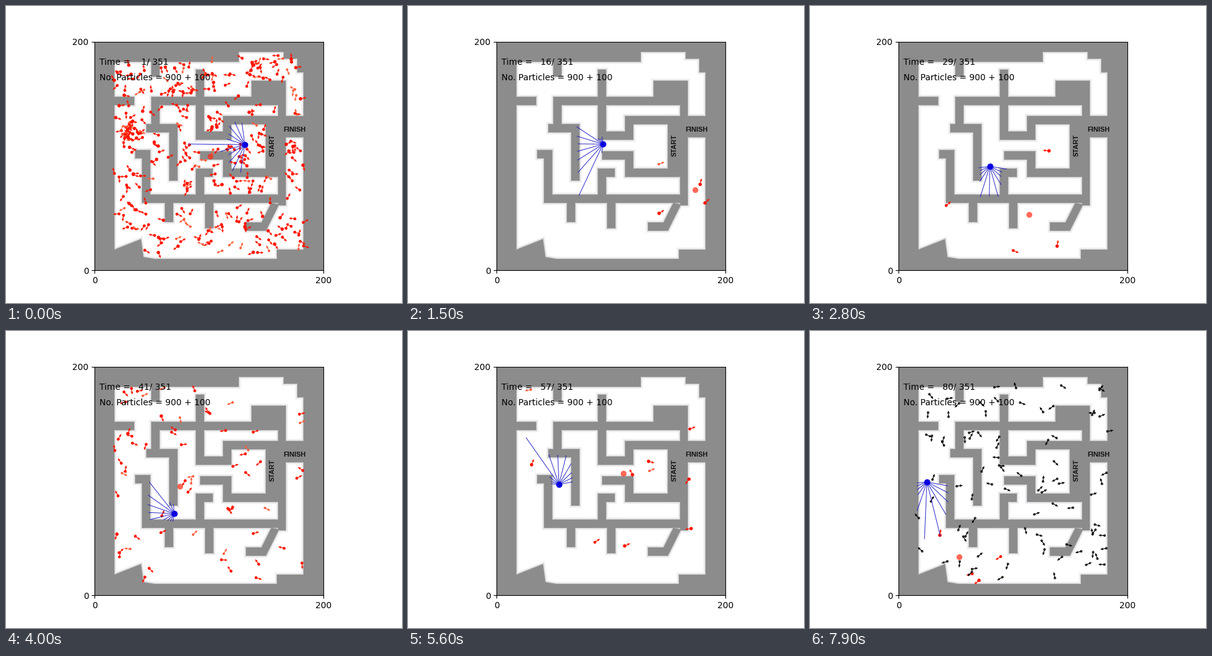
Animation of 640 by 480 pixels, one loop 8000 ms. Source, as a matplotlib script:

```python
import numpy as np
import matplotlib.pyplot as plt
from matplotlib.animation import ArtistAnimation
from matplotlib.collections import LineCollection
from matplotlib.patches import PathPatch
from matplotlib.path import Path

FRAMES = 80
PX = 0.72  # points per pixel at 100 dpi
ORIGIN, SCALE = np.array([143.2, 427.2]), np.array([1.848, -1.848])
RED, ORANGE, WALL = "#ff1400", "#ff5a38", "#8c8c8c"


def unit(p):
    """Stage pixels to map units (0..200, y up)."""
    return (np.asarray(p, float) - ORIGIN) / SCALE


def closed(points):
    return Path(np.vstack([points, points[:1]]), closed=True)


def bars(*points, half=6.5):
    """Thick axis-aligned boxes along a polyline."""
    for a, b in zip(points, points[1:]):
        (x0, y0), (x1, y1) = np.minimum(a, b) - half, np.maximum(a, b) + half
        yield closed(unit([(x0, y0), (x1, y0), (x1, y1), (x0, y1)]))


# ---- map ----
room = closed(unit([(175, 90), (376, 90), (376, 74), (449, 74), (449, 85),
                    (471, 85), (471, 107), (481, 107), (481, 394), (438, 394),
                    (438, 409), (240, 409), (222, 406), (218, 377), (175, 394)]))
border = closed(np.array([(-20, -20), (220, -20), (220, 220), (-20, 220)], float))
walls = [
    *bars((170, 153), (200, 153)),
    *bars((241, 84), (241, 107)),
    *bars((313, 109), (313, 209), (357, 209), (357, 184), (480, 184)),
    *bars((233, 197), (270, 197), (270, 275)),
    *bars((241, 197), (241, 153), (446, 153), (446, 315)),
    *bars((215, 239), (226, 239), (226, 311), (446, 311)),
    *bars((313, 311), (313, 269), (327, 269)),
    *bars((320, 241), (357, 241), (357, 269), (446, 269)),
    *bars((263, 311), (263, 342)),
    *bars((328, 311), (328, 352)),
    *bars((436, 194), (436, 260), half=16),   # start block
    *bars((413, 137), (436, 137), half=16),
    *bars((463, 195), (472, 195), half=17),   # finish gate
    closed(unit([(429, 318), (441, 321), (420, 363), (388, 363),
                 (388, 350), (413, 350)])),
]
shapes = [Path.make_compound_path(border, room)] + walls

cells = np.stack(np.meshgrid(*[np.arange(400) / 2 + 0.25] * 2), -1).reshape(-1, 2)
blocked = ~room.contains_points(cells)
for w in walls:
    blocked |= w.contains_points(cells)
blocked = blocked.reshape(400, 400)


def solid(p):
    i = np.clip((np.asarray(p) * 2).astype(int), 0, 399)
    return blocked[i[..., 1], i[..., 0]]


def open_spots(points, count):
    return points[~solid(points)][:count]


# ---- robot: drives along the corridor corners, slowing a little ----
corners = unit([(386, 224), (291, 223), (290, 296), (246, 294),
                (243, 223), (190, 221), (189, 244)])
mileage = np.r_[0, np.cumsum(np.hypot(*np.diff(corners, axis=0).T))]


def position(n):
    travelled = (4.76 * n - 0.0027 * n * n) / SCALE[0]
    return np.array([np.interp(travelled, mileage, c) for c in corners.T])


def robot(n):
    dx, dy = position(n + 2.4) - position(max(n - 2.4, 0))
    return position(n), np.degrees(np.arctan2(dy, dx))


def follow(p, heading, start, n):
    """Apply the robot's own motion since `start` to every particle."""
    (a, ha), (b, hb) = robot(start), robot(n)
    t = np.radians(heading - ha)
    dx, dy = b - a
    move = np.stack([dx * np.cos(t) - dy * np.sin(t),
                     dx * np.sin(t) + dy * np.cos(t)], -1)
    return p + move, heading + hb - ha


def rays(n, rng):
    pos, heading = robot(n)
    t = np.radians(heading - 90 + (np.arange(11) + 0.5) * 180 / 11)
    way = np.stack([np.cos(t), np.sin(t)], -1)
    reach = np.arange(0, 49, 0.4)
    hit = solid(pos + reach[:, None, None] * way)
    length = np.where(hit.any(0), reach[hit.argmax(0)] + 1.5, 49)
    length = np.minimum(length + rng.normal(0, 0.7, 11), 50)
    return [(pos, end) for end in pos + length[:, None] * way]


# ---- particles ----
rng = np.random.default_rng(4)
swarm = np.vstack([open_spots(rng.uniform(15, 190, (1200, 2)), 290),
                   rng.normal(unit((200, 211)), 5, (24, 2))])
swarm_heading = rng.uniform(0, 360, len(swarm))
swarm_life = rng.exponential(2.8, len(swarm))
swarm_weight = rng.choice([0, 1, 2], len(swarm), p=[0.12, 0.7, 0.18])

# step, x, y of the estimate, spread and number of the strong particles
guesses = [(15, 464, 297, 22, 4), (28, 354, 337, 60, 4), (40, 281, 251, 60, 6),
           (56, 348, 230, 60, 10), (69, 234, 138, 2, 3), (79, 241, 365, 28, 4)]


def strong(n):
    """Guess nearest in time, its particles carried by the robot's motion."""
    step, x, y, spread, count = min(guesses, key=lambda g: abs(g[0] - n))
    rng = np.random.default_rng(step)
    mean = unit((x, y))
    p = open_spots(rng.normal(mean, spread, (300, 2)), count)
    heading = rng.uniform(0, 360, count)
    weight = rng.integers(0, 3, count)
    moved, heading = follow(p, heading, step, n)
    keep = ~solid(moved)
    return mean + (moved - p).mean(0), moved[keep], heading[keep], weight[keep]


def draw_particles(p, heading, weight, dark=False):
    t = np.radians(heading)
    color = "black" if dark else np.where(weight > 0, RED, ORANGE)
    dots = ax.scatter(*p.T, s=((3.2 + 0.8 * weight) * PX) ** 2,
                      c="#50503c" if dark else color, edgecolors=color,
                      linewidths=0.5, zorder=1.5)
    arrows = ax.quiver(*p.T, np.cos(t), np.sin(t), color=color, units="dots",
                       scale_units="dots", scale=0.1, width=1.2,
                       headwidth=3.4, headlength=4, headaxislength=3.6, zorder=1.6)
    return [dots, arrows]


# ---- stage ----
fig, ax = plt.subplots(figsize=(6.4, 4.8), dpi=100)
ax.set(xlim=(0, 200), ylim=(0, 200), xticks=[0, 200], yticks=[0, 200], aspect="equal")
for width, color in [(8, "#f8f8f8"), (5.5, "#ebebee"), (2, "#bebebe")]:
    for s in shapes:
        ax.add_patch(PathPatch(s, fc="none", ec=color, lw=width * PX, zorder=0.4))
for s in shapes:
    ax.add_patch(PathPatch(s, fc=WALL, ec="none", zorder=0.5))
for word, at, angle in [("START", (431, 225), 90), ("FINISH", (466, 200), 0)]:
    ax.text(*unit(at), word, rotation=angle, ha="center", va="center",
            family="Liberation Sans", weight="bold", size=11 * PX, color="#101010",
            zorder=0.6)


def build(n):
    rng = np.random.default_rng(100 + n)
    art = []
    mean, p, heading, weight = strong(max(n, 8))
    if n < 8:
        p, heading = follow(swarm, swarm_heading, 0, n)
        keep = (swarm_life >= n * 0.9) & ~solid(p)
        p, heading, weight = p[keep], heading[keep], swarm_weight[keep]
        mean = unit((330, 243)) * (1 - n / 8) + mean * n / 8
    if len(p):
        art += draw_particles(p, heading, weight)

    # fresh random particles show in bursts, dark once their weight is low
    if n >= 8 and (n + 1) % 10 < 5:
        dark = n > 60
        q = open_spots(rng.uniform(15, 190, (400, 2)), 85 if dark else 56)
        w = rng.choice([0, 1], len(q), p=[0.25, 0.75])
        art += draw_particles(q, rng.uniform(0, 360, len(q)), w * (not dark), dark)

    beams = LineCollection(rays(n, rng), colors="#1414c8", linewidths=0.9 * PX, zorder=2)
    art.append(ax.add_collection(beams, autolim=False))
    art.append(ax.scatter(*mean, s=(9.4 * PX) ** 2, c="#ff2810", alpha=0.7, lw=0,
                          zorder=2.1))
    art.append(ax.scatter(*robot(n)[0], s=(10 * PX) ** 2, c="#0a00e0", lw=0, zorder=2.2))
    art.append(ax.text(4.2, 180, f"Time = {n + 1:4d}/ 351"))
    art.append(ax.text(4.2, 166.5, "No. Particles = 900 + 100"))
    return art


anim = ArtistAnimation(fig, [build(n) for n in range(FRAMES)], interval=100,
                       repeat=True, repeat_delay=0, blit=False)
plt.show()
```
